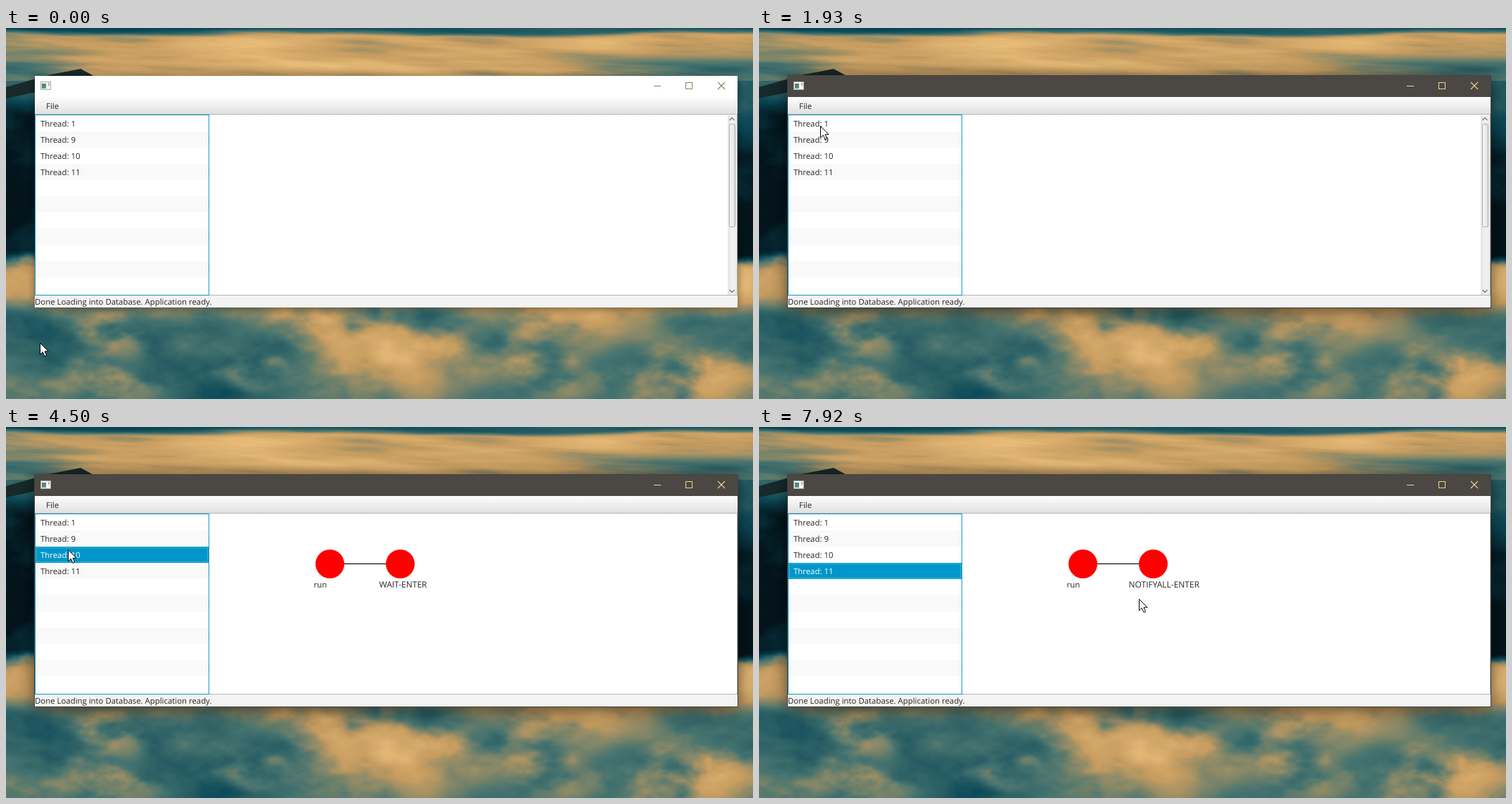
These frames come from a looping animation (1062x527 px, 8000 ms). An HTML page with a canvas:

```html
<!DOCTYPE html>
<html lang="en">
<head>
<meta charset="utf-8">
<title>Thread viewer</title>
<style>
html, body { margin: 0; width: 100%; height: 100%; overflow: hidden; background: #12444f; }
canvas, svg { position: absolute; left: 0; top: 0; display: block; }
text { font: 11.4px "Open Sans", "Noto Sans", sans-serif; fill: #262626; text-rendering: geometricPrecision; }
</style>
</head>
<body>
<canvas id="stage" width="1062" height="527"></canvas>
<svg width="1062" height="527" viewBox="0 0 1062 527">
  <g id="labels"></g>
  <path id="cursor" d="M.5 .5V16.8L4.3 13.2L7 19.3L9.6 18.2L7 12.2H12Z" fill="#fff" stroke="#000"/>
</svg>
<script>
const W = 1062, H = 527, LOOP = 8000, ROW = 23;
const ctx = document.getElementById('stage').getContext('2d');
const labels = document.getElementById('labels');
const cursor = document.getElementById('cursor');

// ---------- cloudy desktop ----------
function smooth(a, b, x) {
  const k = Math.min(1, Math.max(0, (x - a) / (b - a)));
  return k * k * (3 - 2 * k);
}
function hash(x, y) {
  let h = Math.imul(x, 374761393) + Math.imul(y, 668265263);
  h = Math.imul(h ^ (h >>> 13), 1274126177);
  return ((h ^ (h >>> 16)) >>> 0) / 4294967296;
}
function noise(x, y) {
  const ix = Math.floor(x), iy = Math.floor(y);
  const u = smooth(0, 1, x - ix), v = smooth(0, 1, y - iy);
  const a = hash(ix, iy), b = hash(ix + 1, iy), c = hash(ix, iy + 1), d = hash(ix + 1, iy + 1);
  return a + (b - a) * u + (c - a) * v + (a - b - c + d) * u * v;
}
function fbm(x, y) {
  let sum = 0;
  for (let amp = 0.5; amp > 0.03; amp /= 2) {
    sum += amp * (noise(x, y) - 0.5);
    x = x * 2 + 17;
    y = y * 2 + 31;
  }
  return sum;
}

const tones = ['03141b', '0a4858', '46736f', 'c69c60', 'efc27c']
  .map(h => [0, 2, 4].map(i => parseInt(h.slice(i, i + 2), 16)));
function tone(v) {
  v = Math.min(0.999, Math.max(0, v)) * (tones.length - 1);
  const i = Math.floor(v);
  return tones[i].map((a, n) => a + (tones[i + 1][n] - a) * (v - i));
}

// lit and shaded clouds: x, y, radius, light
const clouds = [
  [560, 480, 125, 0.36], [475, 425, 75, 0.24], [145, 444, 50, 0.25], [150, 510, 60, 0.28],
  [330, 495, 45, 0.18], [840, 425, 90, 0.28], [780, 505, 65, 0.24], [1000, 512, 80, 0.34],
  [735, 430, 50, -0.14], [910, 475, 75, -0.14]
];
function streaks(x, y) {
  const n = fbm(x / 170 + 3, (y - x * 0.05) / 15 + 5);
  const edge = 7 + 3 * Math.sin(x / 90) + n * 16;
  return 0.3 + n * 0.5 + 0.5 * smooth(edge - 5, edge + 6, y)
    - 0.32 * smooth(700, 950, x) * smooth(28, 55, y + n * 30)
    - 0.35 * smooth(140, 20, x) * smooth(25, 60, y);
}
function sides(x, y) {
  const right = x > W / 2, n = fbm(x / 60, y / 45);
  const dark = smooth(75, right ? 240 : 130, y) * smooth(335, 315, y + n * 30);
  return 0.38 + n * 0.4 - 0.33 * dark + (right ? 0.5 : 0.33) * smooth(320, 345, y + n * 30);
}
function puffs(x, y) {
  const n = fbm(x / 120 + 9, y / 65 + 2), m = fbm(x / 70 + 40, y / 45 + 8);
  return clouds.reduce((v, [cx, cy, r, light]) => {
    const dx = (x + n * 160 - cx) / r, dy = (y + m * 80 - cy) / r * 2.1;
    return v + light * Math.exp(-dx * dx - dy * dy);
  }, 0.46 + n * 0.5 + m * 0.35);
}
function light(x, y) {
  if (y < 75) return streaks(x, y);
  const k = smooth(370, 420, y);
  return (k < 1 ? sides(x, y) * (1 - k) : 0) + (k > 0 ? puffs(x, y) * k : 0);
}
function makeSky() {
  const c = document.createElement('canvas');
  c.width = W;
  c.height = H;
  const g = c.getContext('2d'), img = g.createImageData(W, H);
  for (let y = 0; y < H; y++) {
    for (let x = 0; x < W; x++) {
      const hidden = x > 45 && x < 1035 && y > 75 && y < 395;
      if (!hidden) img.data.set([...tone(light(x, y)), 255], (y * W + x) * 4);
    }
  }
  g.putImageData(img, 0, 0);
  g.fillStyle = '#17292b';
  g.beginPath();
  [[0, 84], [60, 67], [106, 58], [132, 72], [0, 100]].forEach(p => g.lineTo(...p));
  g.fill();
  return c;
}
const sky = makeSky();

// ---------- drawing helpers ----------
function box(x, y, w, h, fill) {
  ctx.fillStyle = fill;
  ctx.fillRect(x, y, w, h);
}
function frame(x, y, w, h, color) {
  ctx.strokeStyle = color;
  ctx.lineWidth = 1;
  ctx.strokeRect(x + 0.5, y + 0.5, w - 1, h - 1);
}
function line(color, width, ...pts) {
  ctx.strokeStyle = color;
  ctx.lineWidth = width;
  ctx.beginPath();
  pts.forEach(p => ctx.lineTo(...p));
  ctx.stroke();
}
function fade(x0, y0, x1, y1, ...colors) {
  const g = ctx.createLinearGradient(x0, y0, x1, y1);
  colors.forEach((c, i) => g.addColorStop(i / (colors.length - 1), c));
  return g;
}

function drawTitle(active) {
  ctx.save();
  ctx.shadowColor = active ? 'rgba(0,0,0,.6)' : 'rgba(0,0,0,.42)';
  ctx.shadowBlur = active ? 24 : 12;
  ctx.shadowOffsetY = active ? 4 : 2;
  if (active) box(40, 67, 1001, 331, '#45423e');
  else box(41, 68, 999, 329, '#fff');
  ctx.restore();
  box(41, 68, 999, 30, active ? '#4b4844' : '#fff');

  box(49, 76, 15, 12, '#f5f5f2');
  frame(49, 76, 15, 12, '#a3a8a6');
  box(51, 79, 6, 7, fade(51, 79, 57, 86, '#3d7474', '#6f9d8c'));
  box(60, 78, 2, 4, '#a3b8b2');

  const ink = active ? '#f4d28f' : '#8b8060';
  box(921, 82, 10, 1, ink);
  frame(966, 77, 10, 10, ink);
  line(ink, 1.1, [1012, 77], [1022, 87]);
  line(ink, 1.1, [1022, 77], [1012, 87]);
}

function drawScrollbar() {
  box(1026, 124, 13, 255, fade(1026, 0, 1039, 0, '#e4e4e4', '#f2f2f2', '#ececec'));
  ctx.fillStyle = fade(1028, 0, 1037, 0, '#fafafa', '#dedede');
  ctx.strokeStyle = '#a9acac';
  ctx.lineWidth = 1;
  ctx.beginPath();
  ctx.roundRect(1028.5, 136.5, 8, 146, 2);
  ctx.fill();
  ctx.stroke();
  for (const [y, dir] of [[129, 1], [374, -1]]) {
    line('#777', 1.3, [1028.5, y + 2 * dir], [1032, y - 1.5 * dir], [1035.5, y + 2 * dir]);
  }
}

function drawGraph() {
  line('#111', 1.3, [460, 194.3], [560, 194.3]);
  ctx.fillStyle = '#f00';
  for (const x of [460.5, 560.5]) {
    ctx.beginPath();
    ctx.arc(x, 194.5, 20.5, 0, 7);
    ctx.fill();
  }
}

function drawWindow({ active, row, graph, bar }) {
  drawTitle(active);
  box(41, 98, 999, 25, fade(0, 98, 0, 122, '#fdfdfd', '#efefef', '#e0e0e0'));
  box(41, 122, 999, 1, '#b2b2b2');
  box(41, 123, 999, 257, '#fff');
  frame(288, 122, 752, 258, '#b4b4b4');
  box(41, 380, 999, 17, '#f3f3f3');
  for (let i = 1; i < 11; i += 2) box(42, 124 + ROW * i, 246, ROW, '#f9f9f9');
  if (row >= 0) {
    box(42, 124 + ROW * row, 246, ROW, '#0096c9');
    frame(43, 125 + ROW * row, 244, ROW - 2, '#35addb');
  }
  frame(41, 123, 248, 257, '#0e9ac8');
  if (bar) drawScrollbar();
  if (graph) drawGraph();
}

// ---------- text ----------
function label(x, y, str = '') {
  const el = document.createElementNS('http://www.w3.org/2000/svg', 'text');
  labels.appendChild(el);
  el.setAttribute('y', y);
  setLabel(el, x, str);
  return el;
}
function setLabel(el, x, str) {
  el.setAttribute('x', x);
  el.textContent = str;
}
label(57, 115, 'File');
label(41, 393, 'Done Loading into Database. Application ready.');
const rows = [1, 9, 10, 11].map((n, i) => label(49, 139.5 + ROW * i, 'Thread: ' + n));
const left = label(0, 228), right = label(0, 228);
right.style.fontSize = '12px';
const names = [
  ['main', 436.5, 'startAll', 532.5],
  ['run', 437.5, 'WAIT-ENTER', 530.5],
  ['run', 437.5, 'NOTIFYALL-ENTER', 525.5]
];
function showNames(i) {
  const [a, ax, b, bx] = names[i] || ['', 0, '', 0];
  setLabel(left, ax, a);
  setLabel(right, bx, b);
}

// ---------- timeline ----------
const TICK = 77;
// first tick, last tick, end x, end y, sideways bow
const moves = [
  [610, 1380, 82, 148, -85],
  [1450, 1610, 87, 139],
  [2720, 3020, 88, 161],
  [4120, 4350, 88, 174],
  [4980, 5210, 88, 195],
  [6830, 7140, 422, 312],
  [7460, 7920, 540, 244]
];
function pointer(t) {
  let x = 48, y = 447;
  for (const [t0, t1, endX, endY, bow = 0] of moves) {
    if (t < t0) break;
    const gaps = Math.round((t1 - t0) / TICK);
    const tick = Math.min(gaps, Math.floor((t - t0) / (t1 - t0) * gaps + 0.01));
    const k = (tick + 1) / (gaps + 1), e = (k + smooth(0, 1, k)) / 2;
    x = Math.round(x + (endX - x) * e + 2 * bow * e * (1 - e));
    y = Math.round(y + (endY - y) * e);
  }
  return [x, y];
}
const passed = (t, ...times) => times.filter(x => t >= x).length - 1;

function render(t) {
  const row = passed(t, 2010, 3420, 4500, 5440);
  ctx.drawImage(sky, 0, 0);
  drawWindow({ active: t >= 1930, row, graph: t >= 2170, bar: t < 2240 });
  rows.forEach((el, i) => { el.style.fill = i === row ? '#fff' : ''; });
  showNames(passed(t, 2170, 3570, 5520));
  cursor.setAttribute('transform', `translate(${pointer(t)})`);
}
const start = performance.now();
function tick() {
  render((performance.now() - start) % LOOP);
  requestAnimationFrame(tick);
}
tick();
</script>
</body>
</html>
```
